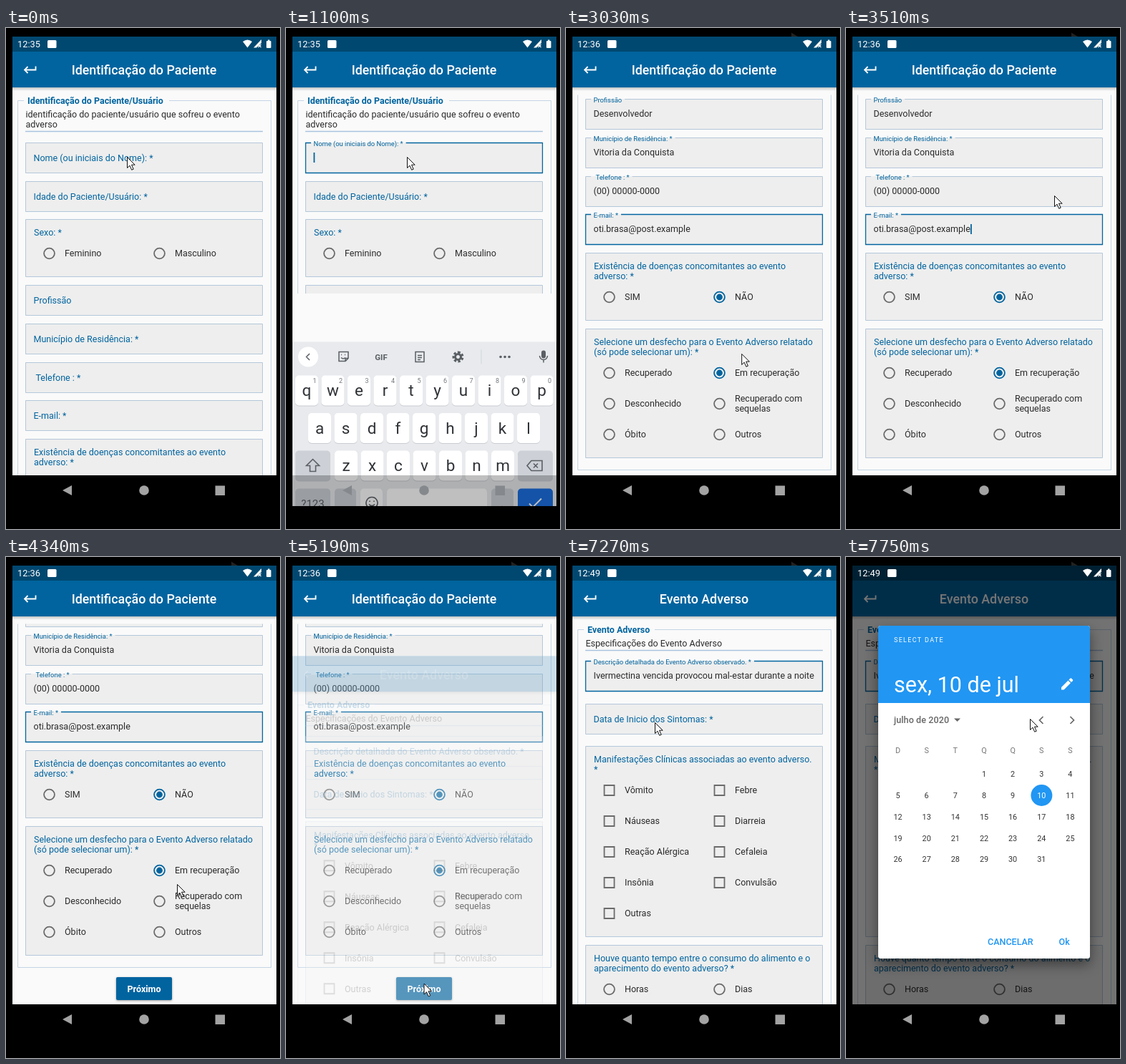
These frames come from a looping animation (383 by 700 pixels, 8000 ms). An HTML page with a canvas:

```html
<!DOCTYPE html>
<html lang="pt">
<head>
<meta charset="utf-8">
<style>
html, body { margin: 0; height: 100%; overflow: hidden; background: #000; }
canvas { display: block; width: 383px; height: 700px; }
</style>
</head>
<body>
<canvas></canvas>
<script>
const LOOP = 8000;
const BLUE = '#01649f', INK = '#2b2b2b', LINE = '#b4c7da', PAPER = '#fafafa', ACCENT = '#2196f3';
const canvas = document.querySelector('canvas');
const ctx = canvas.getContext('2d');
const ratio = window.devicePixelRatio || 1;
canvas.width = 383 * ratio;
canvas.height = 700 * ratio;

const lerp = (a, b, p) => a + (b - a) * p;
const progress = (t, from, to) => Math.min(1, Math.max(0, (t - from) / (to - from)));
const ease = (t, from, to) => { const p = progress(t, from, to); return p * p * (3 - 2 * p); };

// y is the middle of the capitals
function text(s, x, y, { size = 12.53, color = INK, weight = 400, align = 'left', spacing = 0 } = {}) {
  ctx.font = `${weight} ${size}px Roboto, sans-serif`;
  ctx.letterSpacing = spacing + 'px';
  ctx.textAlign = align;
  ctx.fillStyle = color;
  ctx.fillText(s, x, y + size * 0.355);
}
function box(x, y, w, h, fill, r = 0) {
  ctx.beginPath();
  ctx.roundRect(x, y, w, h, r);
  ctx.fillStyle = fill;
  ctx.fill();
}
function disc(x, y, r, fill) {
  ctx.beginPath();
  ctx.arc(x, y, r, 0, 7);
  ctx.fillStyle = fill;
  ctx.fill();
}
function shape(d, fill) {
  ctx.fillStyle = fill;
  ctx.fill(new Path2D(d));
}
function line(d, color, width = 1) {
  ctx.strokeStyle = color;
  ctx.lineWidth = width;
  ctx.stroke(new Path2D(d));
}
function clipped(x, y, w, h, draw) {
  ctx.save();
  ctx.beginPath();
  ctx.rect(x, y, w, h);
  ctx.clip();
  draw();
  ctx.restore();
}

function panel(y, h) {
  box(27, y, 332, h, '#eeeeee');
  line(`M27.5 ${y + .5}h331v${h - 1}h-331z`, LINE);
}
function field(y, label, { value = '', float = value ? 1 : 0, focused = false, x = 38.5, caret = 0 } = {}) {
  const size = lerp(12.53, 9.4, float);
  box(27, y, 332, 43, '#eeeeee');
  ctx.font = `400 ${size}px Roboto, sans-serif`;
  ctx.letterSpacing = '0px';
  const gapEnd = float ? lerp(35, x + ctx.measureText(label).width + 4, float) : 35;
  line(`M35 ${y + .5}H27.5v42h331v-42H${gapEnd}`, focused ? BLUE : LINE, focused ? 1.3 : 1);
  text(label, x, lerp(y + 21.3, y + 1.5, float), { size, color: BLUE });
  text(value, 38.5, y + 21);
  if (caret) box(caret, y + 14, 1.8, 14, BLUE);
}
function radio(x, y, label, on) {
  ctx.beginPath();
  ctx.arc(x, y, 7.4, 0, 7);
  ctx.strokeStyle = on ? BLUE : '#6b6b6b';
  ctx.lineWidth = 1.8;
  ctx.stroke();
  if (on) disc(x, y, 4.4, BLUE);
  if (label) text(label, x + 21.5, y);
}
function checkbox(x, y, label) {
  line(`M${x - 7} ${y - 7}h14v14h-14z`, '#6b6b6b', 1.8);
  text(label, x + 21.5, y);
}
function lines(rows, x, y, color) {
  rows.forEach((row, i) => text(row, x, y + 14 * i, { color }));
}
function fieldset(legend, height, gapEnd) {
  line(`M25 101.5H16.5v${height}h354v-${height}H${gapEnd}`, '#c3d5e5');
  text(legend, 30, 101.5, { color: BLUE, weight: 700, size: 12.45 });
}
function appBar(title) {
  box(9, 33, 369, 592, PAPER);
  const shade = ctx.createLinearGradient(0, 83, 0, 88);
  shade.addColorStop(0, 'rgba(0,0,0,.22)');
  shade.addColorStop(1, 'rgba(0,0,0,0)');
  box(9, 83, 369, 5, shade);
  box(9, 33, 369, 50, BLUE);
  line('M41.500 53.500V58.500H26.500M30.500 54L26 58.500L30.500 63', '#fff', 1.8);
  text(title, 193, 59, { size: 17.85, weight: 500, color: '#fff', align: 'center' });
}

function patientPage(t) {
  appBar('Identificação do Paciente');
  const filled = t >= 1790, chosen = t >= 2940;
  const typing = t >= 770 && !filled;
  const scroll = 260 * ease(t, 2500, 2900) + 44 * ease(t, 3600, 3800);
  const blink = filled ? t < 2000 || Math.floor((t - 2000) / 500) % 2 === 1 : t < 1480;
  const value = s => filled ? s : '';
  const bottom = t >= 930 && !filled ? 371 : 625;
  clipped(9, 93.5, 369, bottom - 93.5, () => {
    ctx.translate(0, -scroll);
    fieldset('Identificação do Paciente/Usuário', 776, 228);
    lines(['identificação do paciente/usuário que sofreu o evento', 'adverso'], 27.5, 120.5);
    line('M27 144.500H359', '#a9c3df', 1.5);
    field(160, 'Nome (ou iniciais do Nome): *', {
      value: value('Otilio Brasa'), float: ease(t, 770, 1000), focused: typing, caret: typing && blink ? 38.5 : 0 });
    field(214, 'Idade do Paciente/Usuário: *', { value: value('30') });
    panel(267, 81);
    text('Sexo: *', 39, 286, { color: BLUE });
    radio(60.5, 315, 'Feminino');
    radio(214.5, 315, 'Masculino', filled);
    field(359, 'Profissão', { value: value('Desenvolvedor') });
    field(413, 'Município de Residência: *', { value: value('Vitoria da Conquista') });
    field(467, 'Telefone : *', { value: value('(00) 00000-0000'), x: 41.5 });
    field(520, 'E-mail: *', {
      value: value('oti.brasa@post.example'), focused: filled, caret: filled && blink ? 174 : 0 });
    panel(574, 95);
    lines(['Existência de doenças concomitantes ao evento', 'adverso: *'], 39, 593, BLUE);
    radio(60.5, 636, 'SIM');
    radio(214.5, 636, 'NÃO', chosen);
    panel(680, 181);
    lines(['Selecione um desfecho para o Evento Adverso relatado', '(só pode selecionar um): *'], 39, 699, BLUE);
    radio(60.5, 742, 'Recuperado');
    radio(214.5, 742, 'Em recuperação', chosen);
    radio(60.5, 785, 'Desconhecido');
    radio(214.5, 785);
    lines(['Recuperado com', 'sequelas'], 236, 778);
    radio(60.5, 828, 'Óbito');
    radio(214.5, 828, 'Outros');
    ctx.shadowColor = 'rgba(0,0,0,.4)';
    ctx.shadowBlur = 3 * ratio;
    ctx.shadowOffsetY = ratio;
    box(154, 891, 78, 32, BLUE, 2);
    ctx.shadowColor = 'transparent';
    text('Próximo', 193, 907.5, { weight: 700, color: '#fff', align: 'center' });
  });
}

function eventPage(t) {
  const described = t >= 5970;
  const blink = t < 6260 || (t >= 6760 && t < 7270);
  appBar('Evento Adverso');
  fieldset('Evento Adverso', 700, 124);
  text('Especificações do Evento Adverso', 27.5, 120.5);
  line('M27 130.500H359', '#a9c3df', 1.5);
  field(145, 'Descrição detalhada do Evento Adverso observado. *', {
    value: described ? 'Ivermectina vencida provocou mal-estar durante a noite' : '',
    focused: described, caret: described && blink ? 347 : 0 });
  field(205, 'Data de Inicio dos Sintomas: *');
  panel(264, 267);
  lines(['Manifestações Clínicas associadas ao evento adverso.', '*'], 39, 283, BLUE);
  ['Vômito', 'Febre', 'Náuseas', 'Diarreia', 'Reação Alérgica', 'Cefaleia', 'Insônia', 'Convulsão', 'Outras']
    .forEach((label, i) => checkbox(i % 2 ? 214.5 : 60.5, 326 + 43 * (i >> 1), label));
  panel(542, 140);
  lines(['Houve quanto tempo entre o consumo do alimento e o', 'aparecimento do evento adverso? *'], 39, 561, BLUE);
  radio(60.5, 604, 'Horas');
  radio(214.5, 604, 'Dias');
}

function datePicker() {
  ctx.shadowColor = 'rgba(0,0,0,.45)';
  ctx.shadowBlur = 18 * ratio;
  ctx.shadowOffsetY = 8 * ratio;
  box(45, 96, 296, 465, '#fff', 3.5);
  ctx.shadowColor = 'transparent';
  box(45, 96, 296, 108, ACCENT, [3.5, 3.5, 0, 0]);
  text('SELECT DATE', 67, 116, { size: 8.97, color: '#fff', spacing: 1.35 });
  text('sex, 10 de jul', 67, 178, { size: 30.5, color: '#fff' });
  shape('M301 182V185.500H304.500L314 176L310.500 172.500ZM311.500 171.500L313.500 169.500Q314.200 169 315 169.500L317 171.500Q317.600 172.200 317 173L315 175Z', '#fff');
  text('julho de 2020', 67, 228, { weight: 500, color: '#666', spacing: .1 });
  shape('M151 225.500H160L155.500 230Z', '#666');
  line('M275.500 223L270.500 228L275.500 233M313.500 223L318.500 228L313.500 233', '#666', 1.7);
  const column = i => 72.5 + 40.15 * i;
  [...'DSTQQSS'].forEach((day, i) => text(day, column(i), 270, { size: 10.8, color: '#777', align: 'center' }));
  disc(273.4, 333, 15, ACCENT);
  for (let day = 1; day <= 31; day++) {
    const cell = day + 2;
    text(day, column(cell % 7), 303 + 29.9 * Math.floor(cell / 7),
      { size: 10.8, color: day === 10 ? '#fff' : '#333', align: 'center' });
  }
  text('CANCELAR', 198, 538, { weight: 500, color: ACCENT });
  text('Ok', 297.5, 538, { weight: 500, color: ACCENT });
}

function keyboard(top) {
  const grey = '#5a5f64', dark = '#cdd1d7';
  const key = (x, y, w, fill = '#fff') => {
    box(x, y + 1, w, 42, '#c9ccd1', 5);
    box(x, y, w, 42, fill, 5);
  };
  const letters = (row, x, y, hints) => [...row].forEach((c, i) => {
    const cx = x + 36.5 * i;
    key(cx - 16, y, 32);
    text(c, cx, y + 20.5, { size: 22.5, color: '#2f3236', align: 'center' });
    if (hints) text((i + 1) % 10, cx + 11, y + 7, { size: 9, color: '#70757a', align: 'center' });
  });
  ctx.save();
  ctx.translate(0, top);
  box(9, 0, 369, 300, '#e8eaed');
  disc(31, 21, 14, '#fff');
  line('M33 16.500L28.500 21L33 25.500M74 14h13v9l-4 4h-9zM87 23h-4v4M77 18h1M82 18h1M77 22q3 3 6 0', grey, 1.5);
  text('GIF', 133, 21, { size: 11.5, weight: 700, color: grey, align: 'center' });
  line('M181 14h12v14h-12zM184 14h6M184 19h6M184 22h6M184 25h4', grey, 1.5);
  ctx.setLineDash([3, 2.23]);
  line('M240.500 15a6 6 0 1 1 -.01 0', grey, 4);
  ctx.setLineDash([]);
  line('M240.500 17a4 4 0 1 1 -.01 0', grey, 3);
  line('M273 11V31', '#d3d6da');
  [300, 306, 312].forEach(x => disc(x, 21, 1.8, grey));
  box(357, 12, 6, 11, grey, 3);
  line('M354.500 19.500a5.500 5.500 0 0 0 11 0M360 25v4', grey, 1.5);

  letters('qwertyuiop', 29, 47, true);
  letters('asdfghjkl', 47, 99.5);
  letters('zxcvbnm', 84, 152);
  key(13, 152, 49, dark);
  line('M37.500 164l-9 9h5v8h8v-8h5z', grey, 1.6);
  key(324, 152, 49, dark);
  line('M343 166h15v14h-15l-6 -7zM346 170l6 6M352 170l-6 6', grey, 1.6);
  key(13, 205, 49, dark);
  text('?123', 37.5, 226, { size: 15, color: grey, align: 'center' });
  key(68, 205, 30, dark);
  text(',', 83, 224, { size: 20, color: grey, align: 'center' });
  key(104, 205, 31);
  line('M120 217a8 8 0 1 1 -.01 0M116 227q4 4 8 0M117 222v1.500M123 222v1.500', grey, 1.6);
  key(141, 205, 140);
  key(287, 205, 31, dark);
  text('.', 302, 224, { size: 20, color: grey, align: 'center' });
  key(324, 205, 49, '#1a6fe0');
  line('M340 226l5 5l12 -12', '#fff', 2);
  ctx.restore();
}

function navigation(color) {
  shape('M92 639V653L79 646Z', color);
  disc(193, 646, 6.8, color);
  box(292.5, 639.5, 13.5, 13.5, color);
}
function statusIcons(t) {
  text(t < 1790 ? '12:35' : t < 5970 ? '12:36' : '12:49', 16, 22.5, { size: 12.8, color: '#fff' });
  box(58, 17, 12.5, 11, '#fff', 1.5);
  shape('M331 19Q337.500 14 344 19L337.500 27.500Z', '#fff');
  shape('M357 16V21L350 27.500H346Z', '#fff');
  line('M352.500 23l4 4M356.500 23l-4 4', '#fff', 1.2);
  box(364, 18, 6.5, 10, '#fff', 1);
  box(366, 16.5, 2.5, 2, '#fff');
}

// time, x, y; equal times make a jump
const POINTER = [
  [0, 169, 180], [1790, 169, 180],
  [1790, 293, 207], [2500, 293, 207], [2700, 290, 110], [2940, 290, 110],
  [2940, 240, 480], [3400, 291, 234], [3590, 291, 234], [3800, 275, 78], [4130, 275, 78],
  [4320, 239, 457], [4410, 239, 457], [4700, 192, 603], [5150, 192, 603], [5600, 214.5, 286], [5970, 214.5, 286],
  [5970, 300, 200], [6700, 300, 200], [7040, 124, 231], [7590, 124, 231], [7740, 257, 226], [LOOP, 257, 226]
];
const CLICKS = [[2470, 2700], [3590, 3820], [4950, 5110], [7430, 7590]];

function pointer(t) {
  const i = POINTER.findLastIndex(p => p[0] <= t);
  const [t0, x0, y0] = POINTER[i], [t1, x1, y1] = POINTER[i + 1];
  const p = ease(t, t0, t1);
  ctx.save();
  ctx.translate(lerp(x0, x1, p), lerp(y0, y1, p));
  if (CLICKS.some(([from, to]) => t >= from && t < to)) disc(0, 0, 12, 'rgba(255,242,50,.75)');
  const arrow = 'M.5 .5V15.500L4 12.200L6.700 18.300L9.200 17.200L6.500 11.200H11.200Z';
  shape(arrow, '#fff');
  line(arrow, '#111', 1);
  ctx.restore();
}

function draw(t) {
  ctx.setTransform(ratio, 0, 0, ratio, 0, 0);
  box(0, 0, 383, 700, '#000');
  if (t >= 2940) shape('M315 6.500L324 12H315Z', '#222');
  box(9, 12, 369, 21, '#014870');

  clipped(9, 33, 369, 592, () => {
    const page = ease(t, 5110, 5400);
    if (page < 1) patientPage(t);
    if (page > 0) {
      ctx.globalAlpha = page;
      ctx.translate(0, (1 - page) * 130);
      eventPage(t);
    }
  });

  const dialog = progress(t, 7560, 7740);
  box(9, 12, 369, 613, `rgba(0,0,0,${0.54 * dialog})`);
  statusIcons(t);
  if (dialog > 0) {
    ctx.save();
    ctx.globalAlpha = dialog;
    datePicker();
    ctx.restore();
  }

  const typing = t >= 850 && t < 1790;
  if (typing) {
    const rest = 1 - progress(t, 850, 1250);
    clipped(9, 33, 369, 635, () => {
      keyboard(371 + 297 * rest ** 1.5);
      box(9, 625, 369, 43, `rgba(0,0,0,${rest ** 1.4})`);
    });
  }
  navigation(typing ? '#85888c' : '#a3a3a3');
  pointer(t);
}

function tick() {
  draw(performance.now() % LOOP);
  requestAnimationFrame(tick);
}
tick();
</script>
</body>
</html>
```
